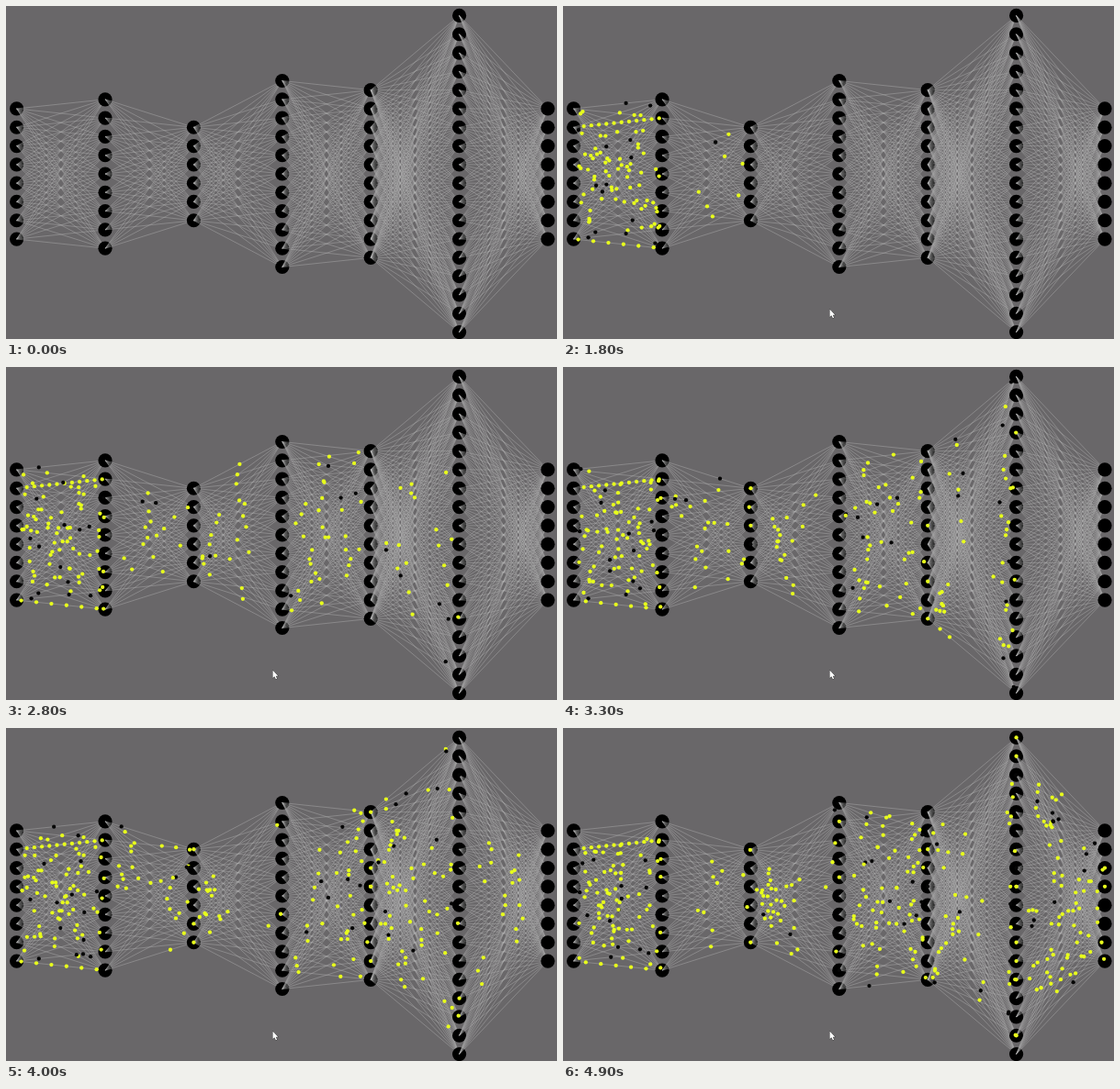
Animation of 600x363 px, one loop 5000 ms. Source, as an HTML page with a canvas:

```html
<!DOCTYPE html>
<html lang="en">
<head>
<meta charset="utf-8">
<title>Signals in a neural network</title>
<style>
  html, body { margin: 0; width: 100%; height: 100%; overflow: hidden; background: #696769; }
  canvas { display: block; width: 600px; height: 363px; }
</style>
</head>
<body>
<canvas id="stage" width="600" height="363"></canvas>
<script>
const LOOP = 5000, START = 400, TICK = 100, SUBSTEPS = 3;
const LAST_STEP = SUBSTEPS * (LOOP - START) / TICK;
const TRAVEL = 11.75; // substeps from one layer to the next
const GAP_X = 96.4, GAP_Y = 20.3;
const LAYERS = [8, 9, 6, 11, 10, 18, 8];
const WAKE = [0, 13, 35, 39, 60, 96]; // substep at which each layer begins to fire

const canvas = document.getElementById('stage');
const ctx = canvas.getContext('2d');
const arrow = new Path2D('M0 0V8.4L1.9 6.7L3.3 9.8L4.6 9.2L3.3 6.2H5.8Z');
const nodeX = layer => 11.6 + GAP_X * layer;
const nodeY = (layer, i) => 183 + GAP_Y * (i - (LAYERS[layer] - 1) / 2);

function hash(...keys) {
  let h = 2166136261;
  for (const key of keys) {
    h = Math.imul(h ^ (key + 1), 2654435761);
    h ^= h >>> 15;
    h = Math.imul(h, 2246822519);
    h ^= h >>> 13;
  }
  return (h >>> 0) / 4294967296;
}

function disc(c, x, y, r, color) {
  c.fillStyle = color;
  c.beginPath();
  c.arc(x, y, r, 0, 2 * Math.PI);
  c.fill();
}

function eachEdge(layer, visit) {
  for (let i = 0; i < LAYERS[layer]; i++)
    for (let j = 0; j < LAYERS[layer + 1]; j++) visit(i, j);
}

function paintNetwork() {
  const image = document.createElement('canvas');
  image.width = canvas.width;
  image.height = canvas.height;
  const c = image.getContext('2d');
  c.fillStyle = '#696769';
  c.fillRect(0, 0, image.width, image.height);
  c.strokeStyle = 'rgba(180,180,180,.55)';
  c.lineWidth = 0.8;
  LAYERS.forEach((count, layer) => {
    for (let i = 0; i < count; i++) disc(c, nodeX(layer), nodeY(layer, i), 7.6, '#000');
    eachEdge(layer, (i, j) => {
      c.beginPath();
      c.moveTo(nodeX(layer), nodeY(layer, i));
      c.lineTo(nodeX(layer + 1), nodeY(layer + 1, j));
      c.stroke();
    });
  });
  return image;
}

// Input edges pulse steadily; the strongest two form dotted lines.
function inputEmits(i, j, born) {
  const strong = j === 1 && i === 1 || j === 8 && i === 7;
  const every = strong ? (j === 1 ? 1 : 2) : 4 + Math.floor(14 * hash(i, j, 5));
  const early = hash(i, j, 9) < 0.12;
  const first = early ? 1 : 12 + Math.floor(every * 0.6 * hash(i, j, 7));
  return born >= first && (born - first) % every === 0;
}

// Hidden neurons fire at random, more often as the run goes on; every fourth is busiest.
function hiddenEmits(layer, i, j, born) {
  if (born < WAKE[layer]) return false;
  const growth = Math.sqrt((born - WAKE[layer] + 3) / (LAST_STEP - WAKE[layer]));
  const activity = 1 + 0.9 * Math.cos(Math.PI / 2 * (i - layer - 1));
  const share = 1.25 / Math.sqrt(LAYERS[layer + 1]);
  return hash(layer, i, born) < 0.1 * activity * growth && hash(layer, i, j, born) < share;
}

function drawSignal(layer, i, j, age) {
  const p = age / TRAVEL;
  const y0 = nodeY(layer, i), y1 = nodeY(layer + 1, j);
  const inhibits = hash(layer, i, j, 77) < 0.15;
  disc(ctx, nodeX(layer) + GAP_X * p, y0 + (y1 - y0) * p, 2.15, inhibits ? '#050505' : '#e8ff1c');
}

function drawSignals(layer, step) {
  eachEdge(layer, (i, j) => {
    for (let age = 1; age < TRAVEL; age++) {
      const born = step - age;
      const emits = layer ? hiddenEmits(layer, i, j, born) : inputEmits(i, j, born);
      const drift = layer ? 2.2 * hash(born, j, i, layer) : hash(i, j, 3);
      if (emits) drawSignal(layer, i, j, Math.min(TRAVEL, age + drift - 0.4));
    }
  });
}

function drawPointer(time) {
  if (time < 800) return;
  const rest = Math.max(0, 1 - (time - 800) / 800);
  ctx.save();
  ctx.translate(290.5 + 296 * rest, 330.5 - 63 * rest);
  ctx.fillStyle = '#fff';
  ctx.strokeStyle = '#333';
  ctx.lineWidth = 1;
  ctx.stroke(arrow);
  ctx.fill(arrow);
  ctx.restore();
}

const network = paintNetwork();

function render(now) {
  const time = Math.floor((now % LOOP) / TICK) * TICK;
  ctx.drawImage(network, 0, 0);
  if (time < START) return;
  const step = SUBSTEPS * ((time - START) / TICK + 1);
  WAKE.forEach((_, layer) => drawSignals(layer, step));
  drawPointer(time);
}

let origin;
function frame(now) {
  origin ??= now;
  render(Math.max(0, now - origin));
  requestAnimationFrame(frame);
}
render(0);
requestAnimationFrame(frame);
</script>
</body>
</html>
```
